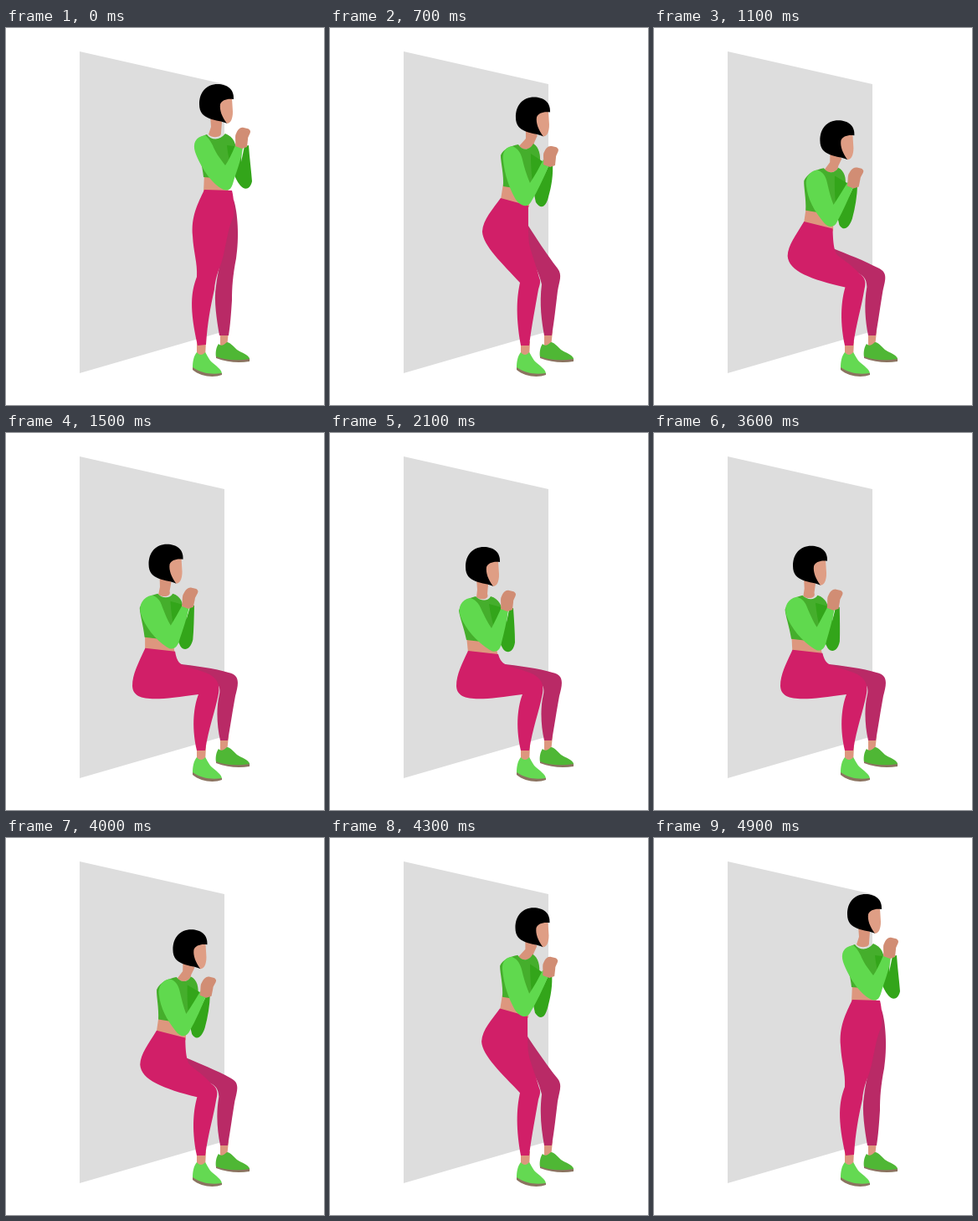
These frames come from a looping animation (380 px wide and 450 px high, 5 s). An HTML page:

```html
<!DOCTYPE html>
<html lang="en">
<head>
<meta charset="utf-8">
<title>Wall sit</title>
<style>
html, body { margin: 0; width: 100%; height: 100%; overflow: hidden; background: #fff; }
svg { display: block; width: 100%; height: 100%; }
</style>
</head>
<body>
<svg id="stage" viewBox="0 0 380 450">
  <path fill="#ddd" d="M88 28L261 67V362L88 412Z"/>
  <path fill="#dd977e" d="M228 374H239L238 393H228ZM256 362H266L264 381H256Z"/>
  <path fill="#4fb735" d="M254 377C251 381 250 388 251 393C262 397 278 400 291 397C293 391 282 388 276 384C271 379 267 375 264 375C260 379 257 380 254 377Z"/>
  <path fill="#64d952" d="M228 387C224 392 223 399 223 406C231 413 245 416 258 413C258 407 250 403 245 398C241 393 239 388 238 387C235 391 231 391 228 387Z"/>
  <g fill="#8b7360">
    <path d="M251 392C262 397 278 397 291 395L291 398C278 400 264 399 251 394Z"/>
    <path d="M223 405L223 408C232 416 248 418 258 414L258 412C245 414 233 412 223 405Z"/>
  </g>
</svg>
<script>
const LOOP = 5000;
const DOWN = { from: 235, to: 1735 }, UP = { from: 3479, to: 4686 };
const KEYS = [0, .31, .85, 1];
const stage = document.getElementById('stage');
const parts = [];
const clamp = (v, a, b) => Math.min(b, Math.max(a, v));
const numbers = d => d.match(/[\d.]+/g).map(Number);

// Just before the deepest point the upper body still leans forward.
function leaning(p) {
  return p.map((v, i) => {
    const k = Math.max(0, 275 - p[i | 1]);
    return i % 2 ? v - Math.min(3, k * .3) : v + Math.min(8, k * .085);
  });
}

function addPart(fill, standing, mid, sitting) {
  const el = document.createElementNS('http://www.w3.org/2000/svg', 'path');
  el.setAttribute('fill', fill);
  stage.append(el);
  parts.push({ el, shape: standing, poses: [numbers(standing), mid, leaning(sitting), sitting] });
}

const bend = (fill, a, b, c) => addPart(fill, a, numbers(b), numbers(c));

function shift(fill, d, b, c) {
  const by = o => numbers(d).map((v, i) => v + o[i % 2]);
  addPart(fill, d, by(b), by(c));
}

// neck
bend('#d8937a',
  'M244 104L258 112L257 125C258 131 246 132 242 127L245 118Z',
  'M234 118L248 128L244 137C243 145 230 147 226 141L234 132Z',
  'M175 173L189 181L188 192C191 199 180 200 175 196L176 187Z');
// midriff
bend('#dd977e',
  'M237 174L262 172L266 197L236 196Z',
  'M207 186L239 190L238 214L204 205Z',
  'M163 242L196 245L201 267L165 262Z');
// far leg
bend('#b92a66',
  'M262 206L272 205C277 220 279 250 275 275C271 295 270 310 270 325C269 340 268 355 266 367L255 367C252 350 248 325 251 308C252 298 254 290 256 280C258 250 260 225 262 206Z',
  'M225 240L237 236C246 250 258 269 272 287C278 295 274 302 272 314C270 330 268 350 265 367L256 367C253 350 250 330 253 306C251 298 249 292 245 284C238 270 230 255 225 240Z',
  'M200 285L203 275C225 278 250 281 266 286C280 289 278 299 274 314C271 330 268 350 265 367L256 367C252 350 251 328 255 312C257 300 252 298 240 296C225 292 210 290 200 285Z');
// near leg
bend('#d11f68',
  'M237 193C229 210 221 225 223 248C224 268 229 280 228 297C221 315 219 335 229 379L239 378C241 350 244 335 249 312C250 300 253 292 256 284C262 270 264 240 272 225C273 212 272 202 270 194Z',
  'M204 203C195 216 183 228 182 243C183 260 206 281 227 304C224 318 221 340 228 379L238 379C242 350 245 335 249 312C251 306 252 302 250 298C246 282 240 268 238 257C237 250 237 235 237 212Z',
  'M165 260C158 275 151 288 151 302C152 322 180 319 230 312C225 325 221 348 228 379L238 379C242 352 250 332 254 311C256 300 252 293 243 288C232 283 222 281 214 278C208 276 204 274 201 264Z');
// shirt
bend('#45ae2c',
  'M240 127C246 135 256 134 262 126C272 130 276 138 275 152C272 165 270 172 262 180L236 178C235 165 230 150 228 140C230 132 234 129 240 127Z',
  'M225 139C230 147 239 146 243 138C250 142 252 152 251 162C249 175 246 185 239 194L207 189C208 175 204 160 204 152C207 144 216 141 225 139Z',
  'M174 195C180 201 189 201 192 195C202 198 206 206 206 217C205 230 203 242 198 251L163 247C160 232 155 220 154 212C157 202 165 197 174 195Z');
// far sleeve
bend('#33a51a',
  'M264 140L282 142L290 140C291 155 293 170 294 183C292 193 285 194 280 188C272 178 266 160 264 140Z',
  'M240 150L260 163L266 160C267 175 265 188 261 202C258 214 252 217 246 208C242 190 240 170 240 150Z',
  'M190 204L212 210L219 209C220 224 221 238 221 250C219 262 212 264 207 258C199 245 193 225 190 204Z');
// gap between the forearms
bend('#f4f4f4',
  'M282 141L285 141L281 160Z',
  'M260 164L262 163L256 176Z',
  'M212 210L214 211L211 226Z');
// near sleeve
bend('#60d94e',
  'M238 128C226 130 223 138 226 148C232 165 245 185 258 192C266 196 269 192 271 186C275 172 281 158 283 143L274 140C270 150 266 158 262 164C255 155 250 148 247 140C244 134 241 130 238 128Z',
  'M217 141C208 143 206 150 207 158C209 176 214 190 221 203C227 213 236 215 240 208C248 195 255 180 262 163L255 157C250 167 245 176 239 185C235 175 232 166 230 157C228 148 223 142 217 141Z',
  'M167 197C157 199 152 208 156 219C162 234 176 250 191 259C199 264 204 258 205 250C208 238 211 226 213 212L205 208C201 217 197 225 193 233C188 226 184 217 181 211C178 203 173 198 167 197Z');
// hands
shift('#d18d74',
  'M274 141C275 135 273 129 275 126C277 121 280 118 284 119C287 120 290 119 292 123C292 127 289 129 289 133L288 142L282 144Z',
  [-19, 22], [-70, 69]);
// face, hair
shift('#df9e85',
  'M254 90C257 85 262 82 270 84L271 100C271 109 268 114 264 114C258 109 254 100 254 90Z',
  [-9, 15.5], [-69, 69]);
shift('#000',
  'M253 67C239 67 231 77 231 91C231 101 236 105 243 108C251 111 258 111 264 114C258 106 255 98 256 91C258 86 264 84 272 85C273 73 264 67 253 67Z',
  [-9, 15.5], [-69, 69]);

// Monotone cubic through the four poses, at rest at both ends.
function blend(v, x) {
  const rise = i => (v[i + 1] - v[i]) / (KEYS[i + 1] - KEYS[i]);
  const slope = i => {
    if (i === 0 || i === 3) return 0;
    const a = rise(i - 1), b = rise(i);
    return a * b > 0 ? 2.6 * a * b / (a + b) : 0;
  };
  const i = x < KEYS[1] ? 0 : x < KEYS[2] ? 1 : 2;
  const h = KEYS[i + 1] - KEYS[i], u = (x - KEYS[i]) / h, w = 1 - u;
  return w * w * (1 + 2 * u) * v[i] + u * u * (1 + 2 * w) * v[i + 1]
    + u * w * h * (w * slope(i) - u * slope(i + 1));
}

const progress = (t, { from, to }) => clamp((t - from) / (to - from), 0, 1);

function draw(now) {
  const t = now % LOOP;
  const x = progress(t, DOWN) - progress(t, UP);
  for (const { el, shape, poses } of parts) {
    let i = 0;
    el.setAttribute('d', shape.replace(/[\d.]+/g, () => {
      const v = poses.map(p => p[i]);
      i++;
      return blend(v, x).toFixed(2);
    }));
  }
  requestAnimationFrame(draw);
}
draw(performance.now());
</script>
</body>
</html>
```
